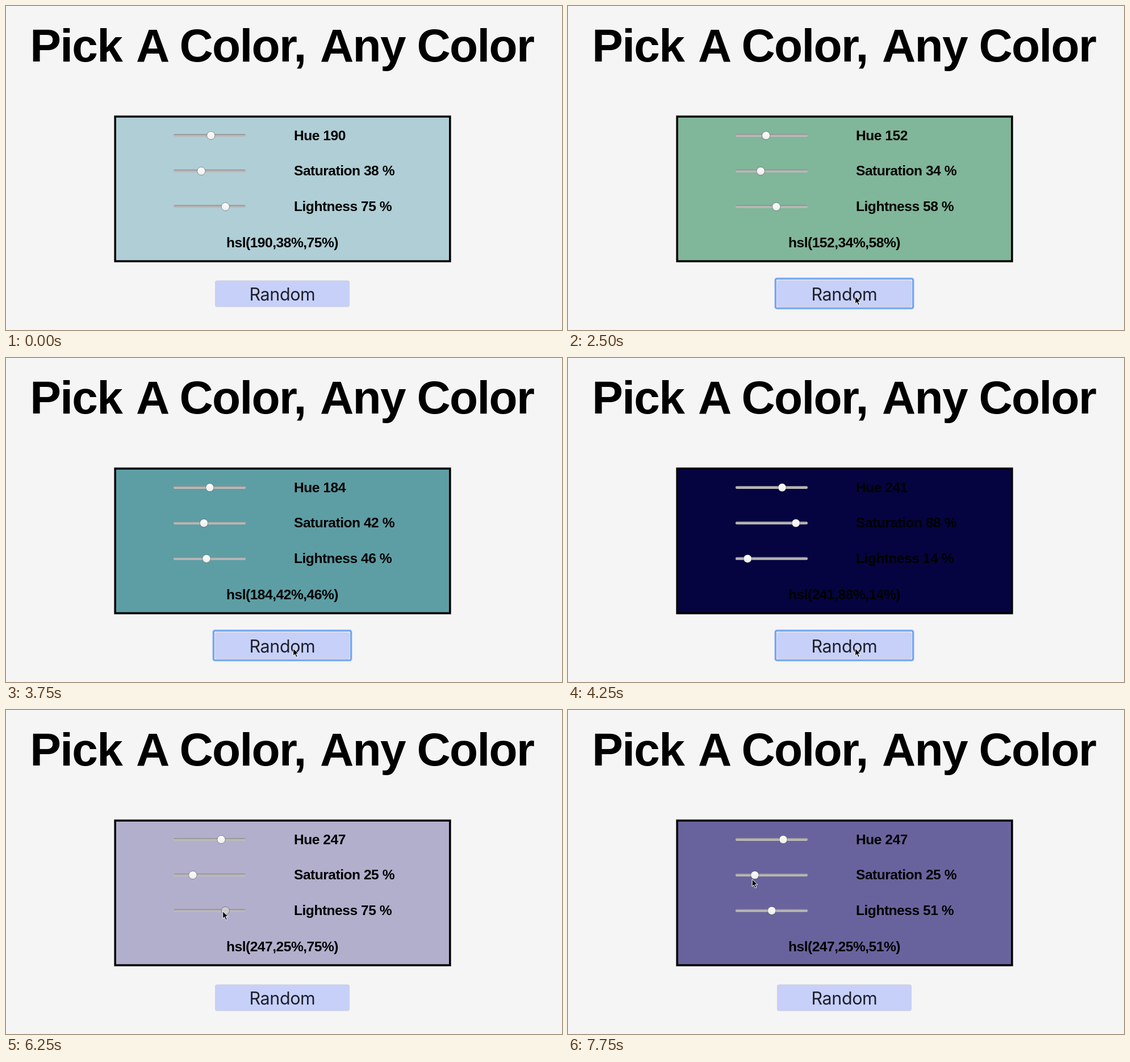
Animation, 979 px wide and 572 px high, one loop 8 s. Source, as an HTML page:

```html
<!DOCTYPE html>
<html lang="en">
<head>
<meta charset="utf-8">
<title>Pick A Color</title>
<style>
  html, body { margin: 0; width: 100%; height: 100%; overflow: hidden; background: #f5f5f5; }
  svg { display: block; width: 100vw; height: 100vh; }
  text { font-family: "Liberation Sans", Arial, Helvetica, sans-serif; font-weight: 700; }
  .title { font-size: 82px; letter-spacing: -1.7px; }
  .label { font-size: 24.6px; letter-spacing: -.5px; }
  .btn { font: 400 30.5px Inter, Roboto, sans-serif; letter-spacing: -.4px; fill: #1d1f2c; text-anchor: middle; }
</style>
</head>
<body>
<svg id="stage" viewBox="0 0 979 572">
  <defs>
    <linearGradient id="groove" x2="0" y2="1">
      <stop offset="0" stop-color="#858585"/>
      <stop offset=".4" stop-color="#b4b3b3"/>
      <stop offset="1" stop-color="#c0bfbf"/>
    </linearGradient>
    <linearGradient id="knob" x2="0" y2="1">
      <stop offset="0" stop-color="#fff"/>
      <stop offset="1" stop-color="#ececec"/>
    </linearGradient>
  </defs>
  <rect width="979" height="572" fill="#f5f5f5"/>
  <g class="title">
    <text x="42.3" y="97.5">Pick</text>
    <text x="229" y="97.5">A</text>
    <text x="305.5" y="97.5">Color,</text>
    <text x="553" y="97.5">Any</text>
    <text x="723.5" y="97.5">Color</text>
  </g>
  <rect id="panel" x="192.2" y="195.2" width="589.6" height="255.4" stroke="#000" stroke-width="3.6"/>
  <g id="rows"></g>
  <text id="code" class="label" x="486.5" y="426" text-anchor="middle"></text>
  <g id="ring" stroke="#6aa0f4">
    <rect x="365.5" y="481.5" width="242" height="52" rx="2.5" fill="none" stroke-width="5" stroke-opacity=".35"/>
    <rect x="365.5" y="481.5" width="242" height="52" rx="2.5" fill="#dfe5f8" stroke-width="2.6"/>
  </g>
  <rect id="button" x="368.5" y="485" width="236" height="46" rx="3" fill="#c7d0f8"/>
  <text class="btn" x="486.5" y="519.7">Random</text>
  <path id="cursor" d="M.7 .9V13.8L3.7 11L6 16.2L8.3 15.2L6 10.1H10.2Z" fill="#000" stroke="#fff" stroke-width="1" stroke-linejoin="round"/>
</svg>
<script>
const LOOP = 8000;
const $ = id => document.getElementById(id);

// Each step changes only the properties it names.
const steps = [
  [0,    { hsl: [190, 38, 75], at: null, focus: false, press: false, grab: false }],
  [500,  { at: [634, 140] }],
  [750,  { at: [618, 223] }],
  [1000, { at: [509, 478] }],
  [1250, { at: [505, 512] }],
  [1500, { focus: true }],
  [2500, { hsl: [152, 34, 58] }],
  [3000, { press: true }],
  [3250, { press: false, hsl: [195, 21, 50] }],
  [3500, { press: true }],
  [3750, { press: false, hsl: [184, 42, 46] }],
  [4250, { hsl: [241, 88, 14] }],
  [4750, { press: true }],
  [5000, { press: false, hsl: [247, 25, 55] }],
  [5250, { at: [448, 465] }],
  [5500, { at: [333, 349] }],
  [5750, { at: [357, 353] }],
  [6000, { focus: false, grab: true }],
  [6250, { at: [381, 354.5], hsl: [247, 25, 75] }],
  [6500, { at: [386, 354.5], hsl: [247, 25, 80] }],
  [6750, { at: [375, 355], hsl: [247, 25, 73] }],
  [7000, { at: [352, 355], hsl: [247, 25, 51] }],
  [7250, { grab: false }],
  [7500, { at: [337, 327] }],
  [7750, { at: [323.5, 298] }]
];

const sliders = [['Hue', '', 360], ['Saturation', ' %', 100], ['Lightness', ' %', 100]];

function add(parent, tag, attrs) {
  const el = document.createElementNS('http://www.w3.org/2000/svg', tag);
  for (const k in attrs) el.setAttribute(k, attrs[k]);
  return parent.appendChild(el);
}

const rows = sliders.map(([name, unit, max], i) => {
  const y = 228.5 + i * 62.8;
  add($('rows'), 'rect', { x: 295, y: y - 2.5, width: 127, height: 5, rx: 2.2, fill: 'url(#groove)' });
  return {
    name, unit, max,
    knob: add($('rows'), 'circle', { cy: y + .2, r: 7.1, stroke: '#000', 'stroke-opacity': .38, 'stroke-width': .9 }),
    text: add($('rows'), 'text', { class: 'label', x: 507, y: y + 8 })
  };
});

// HSL as it appears on a wide-gamut display.
function shade([h, s, l]) {
  s /= 100; l /= 100;
  const a = s * Math.min(l, 1 - l);
  const [r, g, b] = [0, 8, 4].map(n => {
    const k = (n + h / 30) % 12;
    const v = l - a * Math.max(-1, Math.min(k - 3, 9 - k, 1));
    return v <= .04045 ? v / 12.92 : ((v + .055) / 1.055) ** 2.4;
  });
  const out = [.8225 * r + .1775 * g, .0332 * r + .9668 * g, .0171 * r + .0724 * g + .9105 * b];
  return `rgb(${out.map(v => Math.round(255 * (v <= .0031308 ? v * 12.92 : 1.055 * v ** (1 / 2.4) - .055)))})`;
}

function stateAt(t) {
  const state = {};
  for (const [start, change] of steps) if (start <= t) Object.assign(state, change);
  return state;
}

function show(el, on) {
  el.setAttribute('visibility', on ? 'visible' : 'hidden');
}

function draw(t) {
  const { hsl, at, focus, press, grab } = stateAt(t);
  $('panel').setAttribute('fill', shade(hsl));
  rows.forEach((row, i) => {
    row.knob.setAttribute('cx', 300.2 + 114.8 * hsl[i] / row.max);
    row.knob.setAttribute('fill', grab && i === 2 ? '#cbcbcb' : 'url(#knob)');
    row.text.textContent = `${row.name} ${hsl[i]}${row.unit}`;
  });
  $('code').textContent = `hsl(${hsl[0]},${hsl[1]}%,${hsl[2]}%)`;
  show($('ring'), focus);
  $('button').setAttribute('stroke', press ? '#a9aec4' : '#cdd0da');
  $('button').setAttribute('fill', press ? '#c3ccf4' : '#c7d0f8');
  show($('cursor'), at);
  if (at) $('cursor').setAttribute('transform', `translate(${at})`);
}

const begin = performance.now();
function tick() {
  draw((performance.now() - begin) % LOOP);
  requestAnimationFrame(tick);
}
tick();
</script>
</body>
</html>
```
